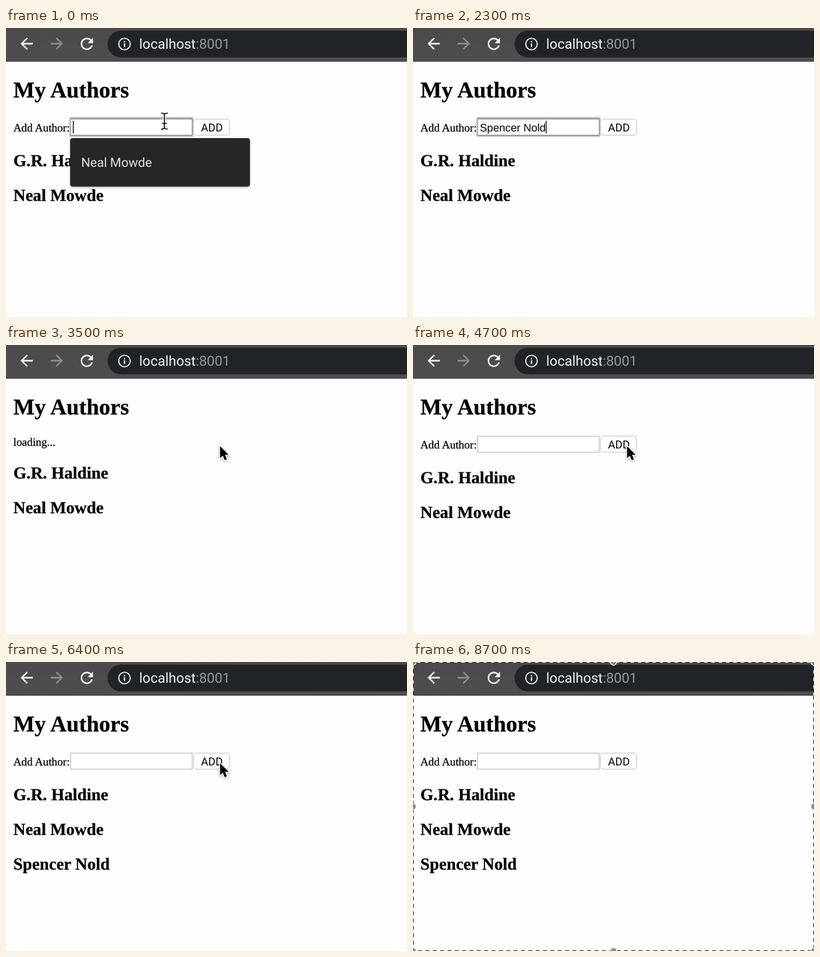
Animation of 600x433 px, one loop 9.6 s. Source, as an HTML page:

```html
<!DOCTYPE html>
<html lang="en">
<head>
<meta charset="utf-8">
<title>My Authors</title>
<style>
  html, body { margin: 0; width: 100%; height: 100%; overflow: hidden; background: #fefdff; }
  svg { display: block; width: 600px; height: 433px; }
  text { white-space: pre; text-rendering: geometricPrecision; }
  .serif { font: 16.8px "Liberation Serif", "Times New Roman", serif; stroke: #000; stroke-width: .25; }
  .h1 { font-size: 33.7px; font-weight: bold; }
  .h2 { font-size: 25.2px; font-weight: bold; }
  .sans { font: 16.3px "Liberation Sans", Arial, sans-serif; }
  .ui { font: 20.7px Roboto, Inter, sans-serif; }
</style>
</head>
<body>
<svg viewBox="0 0 600 433">
  <defs>
    <linearGradient id="bar" x2="0" y2="1">
      <stop offset="0" stop-color="#4b494b"/><stop offset="1" stop-color="#4f4d4f"/>
    </linearGradient>
    <filter id="soft" x="-20%" y="-20%" width="140%" height="150%">
      <feDropShadow dx="0" dy="1" stdDeviation="1.4" flood-opacity=".4"/>
    </filter>
    <path id="back" d="M20 11H7.83l5.59-5.59L12 4l-8 8 8 8 1.41-1.41L7.83 13H20z"/>
    <path id="beamShape" d="M-4.5 -12Q0 -12 0 -9Q0 -12 4.5 -12M0 -9V9M-4.5 12Q0 12 0 9Q0 12 4.5 12M-3 3.5H3"/>
  </defs>

  <rect width="600" height="433" fill="#fefdff"/>

  <g id="page">
    <text class="serif h1" x="11" y="104">My Authors</text>
    <text class="serif" id="loading" x="11">loading...</text>
    <g id="form">
      <text class="serif" x="11" y="154.5">Add Author:</text>
      <rect id="ring" x="95.2" y="133.7" width="185" height="29" rx="2.5" fill="#a9a8ac" stroke="#cfced2" stroke-width="1.6"/>
      <rect id="field" x="96.5" y="136.5" width="182" height="24" fill="#fff"/>
      <text class="sans" id="typed" x="100" y="154.5"></text>
      <rect id="caret" y="139" width="1.2" height="19"/>
      <rect id="button" x="280.5" y="136.5" width="54" height="24" rx="4.5" stroke="#c4c3c6"/>
      <text class="ui" x="308" y="155" text-anchor="middle" style="font-size:16.6px">ADD</text>
    </g>
    <g id="list"></g>
  </g>

  <g id="popup">
    <rect x="96" y="165" width="269" height="72.5" rx="4" fill="#272528" filter="url(#soft)"/>
    <text class="ui" id="hint" x="112.5" y="208" fill="#e3e1e4" style="font-size:19px"></text>
  </g>

  <rect width="600" height="50" fill="url(#bar)"/>
  <rect y="49.5" width="600" height="1" fill="#343235"/>
  <rect x="152" y="4" width="480" height="40" rx="20" fill="#202427"/>
  <g fill="#f1f0f2">
    <use href="#back" transform="translate(17.2 9.7) scale(1.15)"/>
    <use href="#back" transform="translate(89.8 9.7) scale(-1.15 1.15)" fill="#8d8b8e"/>
    <path id="reload" transform="translate(107.2 10) scale(1.15)" d="M17.65 6.35C16.2 4.9 14.21 4 12 4c-4.42 0-7.99 3.58-7.99 8s3.57 8 7.99 8c3.73 0 6.84-2.55 7.73-6h-2.08c-.82 2.33-3.04 4-5.65 4-3.31 0-6-2.69-6-6s2.69-6 6-6c1.66 0 3.14.69 4.22 1.78L13 11h7V4z"/>
    <path id="stop" d="M113.2 16.2l15.6 15.6m0-15.6l-15.6 15.6" stroke="#f1f0f2" stroke-width="2.4"/>
    <circle cx="177.3" cy="24" r="8.6" fill="none" stroke="#e6e5e7" stroke-width="1.9"/>
    <path d="M176.3 22.8h2v5.6h-2zM176.3 19.4h2v2h-2z"/>
  </g>
  <text class="ui" x="199.3" y="31" fill="#f4f3f5">localhost<tspan fill="#96999c">:8001</tspan></text>

  <g id="beam" fill="none" stroke-linecap="round">
    <use href="#beamShape" stroke="#fff" stroke-width="3.4"/>
    <use href="#beamShape" stroke="#111" stroke-width="1.6"/>
  </g>
  <path id="arrow" d="M0 0V18L4.1 14.2L7 21.2L10.2 19.8L7.4 13.1H12.8Z" stroke="#fff" stroke-width="2.4" paint-order="stroke" filter="url(#soft)"/>

  <g id="marquee">
    <rect x=".5" y=".5" width="599" height="432" fill="none" stroke="#fff"/>
    <rect id="ants" x=".5" y=".5" width="599" height="432" fill="none" stroke="#2a2a2a" stroke-dasharray="6 5"/>
    <g id="handles" fill="#8b8a8d" stroke="#f0eff1" stroke-width="1.3"></g>
  </g>
</svg>

<script>
const LOOP = 9600;
const NEW_NAME = "Spencer Nold";
const NAMES = ["G.R. Haldine", "Neal Mowde", NEW_NAME];

// [start, letters typed]
const TYPING = [[0, 0], [500, 1], [800, 2], [1000, 3], [1100, 4], [1200, 5], [1300, 6],
  [1500, 7], [1600, 8], [1800, 9], [2100, 11], [2300, 12], [3500, 0]];

// [start, pointer, x, y]
const POINTER = [[0, "beam", 237, 139.5], [500, ""], [2700, "beam", 238, 139], [2800, "beam", 246, 134],
  [2900, "beam", 270, 135], [3000, "arrow", 300, 140], [3100, "arrow", 328, 148], [3200, "arrow", 337, 152],
  [3300, "arrow", 326, 152], [3400, "arrow", 320.3, 151.5], [8600, "arrow", 332, 143], [8700, ""]];

// [start, page, form, loading baseline, list offset, names shown]
const SCENES = [[0, 1, 1, 0, 0, 2], [3500, 1, 0, 150.5, -7, 2], [4700, 1, 1, 0, 0, 2],
  [5400, 0, 0, 0, 0, 0], [5900, 1, 1, 177, 0, 0], [6400, 1, 1, 0, 0, 3]];

const $ = id => document.getElementById(id);
const at = (steps, t) => steps.findLast(s => s[0] <= t);
const show = (id, on) => { $(id).style.display = on ? "" : "none"; };

function add(parent, tag, attrs, text = "") {
  const el = document.createElementNS("http://www.w3.org/2000/svg", tag);
  for (const k in attrs) el.setAttribute(k, attrs[k]);
  el.textContent = text;
  parent.append(el);
  return el;
}

const rows = NAMES.map((name, i) =>
  add($("list"), "text", { class: "serif h2", x: 11, y: 207 + 52 * i }, name));
$("hint").textContent = NAMES[1];

for (const x of [0, 300, 600])
  for (const y of [0, 216.5, 433])
    if (x !== 300 || y !== 216.5) add($("handles"), "circle", { cx: x, cy: y, r: 4.8 });

function draw(t) {
  const [, page, form, loadingY, shift, count] = at(SCENES, t);
  show("page", page);
  show("form", form);
  show("loading", loadingY);
  $("loading").setAttribute("y", loadingY);
  $("list").setAttribute("transform", `translate(0 ${shift})`);
  rows.forEach((row, i) => { row.style.display = i < count ? "" : "none"; });

  const typed = NEW_NAME.slice(0, at(TYPING, t)[1]);
  const focused = t < 3400;
  $("typed").textContent = typed;
  show("ring", focused);
  show("caret", focused);
  $("field").setAttribute("stroke", focused ? "#8f8e92" : "#b9b8bb");
  if (focused) $("caret").setAttribute("x", 100 + (typed ? $("typed").getComputedTextLength() : 0));
  $("button").setAttribute("fill", t >= 3400 && t < 3500 ? "#dddce0" : "#fff");

  show("popup", t < 600);
  $("popup").style.opacity = t < 500 ? 1 : 0.5;

  const busy = t >= 5200 && t < 6000;
  show("reload", !busy);
  show("stop", busy);

  const [, kind, x, y] = at(POINTER, t);
  for (const id of ["beam", "arrow"]) show(id, id === kind);
  if (kind) $(kind).setAttribute("transform", `translate(${x} ${y})`);

  show("marquee", t >= 8200);
  $("ants").setAttribute("stroke-dashoffset", t < 8300 ? 5 : 0);
}

const start = performance.now();
function tick() {
  draw((performance.now() - start) % LOOP);
  requestAnimationFrame(tick);
}
tick();
</script>
</body>
</html>
```
